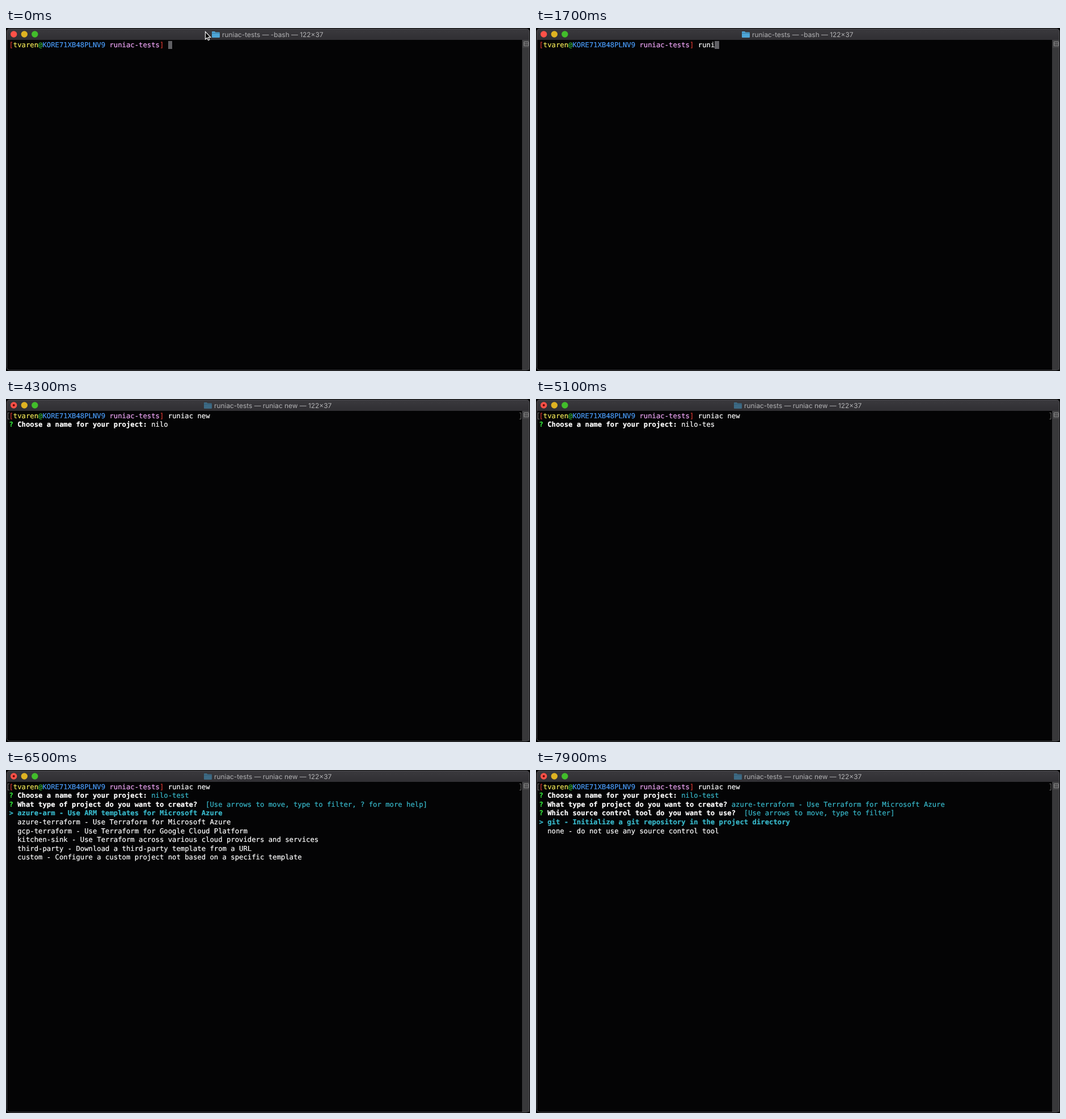
Animation, 924 px wide and 606 px high, one loop 8000 ms. Source, as an HTML page:

```html
<!DOCTYPE html>
<html lang="en">
<head>
<meta charset="utf-8">
<title>Terminal</title>
<style>
html, body { margin: 0; width: 100%; height: 100%; overflow: hidden; background: #040405; }
svg, pre { position: absolute; left: 0; top: 0; }
pre {
  margin: 0; left: 5.4px; top: 22.6px; color: #fff;
  font: 12.26px/15.6px "DejaVu Sans Mono", monospace;
  text-rendering: geometricPrecision; font-variant-ligatures: none;
  -webkit-text-stroke: .2px;
}
b { font-weight: 700; }
.red { color: #d83a32; } .user { color: #f6ec58; } .at { color: #3ab83a; }
.host { color: #4a9cfa; } .dir { color: #f0a6f8; }
.ask { color: #35e43c; } .cyan { color: #38b9cb; }
.caret { background: #606064; }
</style>
</head>
<body>
<svg width="924" height="606" viewBox="0 0 924 606">
  <defs>
    <linearGradient id="bar" x2="0" y2="1">
      <stop stop-color="#3b3a3e"/><stop offset="1" stop-color="#302f33"/>
    </linearGradient>
  </defs>
  <path d="M1 21V7Q1 1 7 1H917Q923 1 923 7V21Z" fill="url(#bar)"/>
  <path d="M910 21H923V604H910Z" fill="#38383a"/>
  <path d="M911 21H923V35H911Z" fill="#444446"/>
  <path d="M913.5 24.5H921.5V31.5H913.5ZM913.5 28H921.5" fill="none" stroke="#8c8c8c"/>
  <rect x="1.5" y="1.5" width="921" height="603" rx="5" fill="none" stroke="#4c4b4f"/>
  <circle cx="13.7" cy="11" r="5.7" fill="#fc5148"/>
  <circle id="dot" cx="13.7" cy="11" r="2" fill="#6a0b08"/>
  <circle cx="32.3" cy="11" r="5.7" fill="#dfb322"/>
  <circle cx="50.8" cy="11" r="5.7" fill="#42bd2b"/>
  <g id="heading">
    <path id="folder" d="M0 7Q0 6 1 6H5L6.5 7.5H13Q14 7.5 14 8.5V16Q14 17 13 17H1Q0 17 0 16Z"/>
    <path d="M0 9.3H14" stroke="#26516c" stroke-opacity=".5"/>
    <text id="title" x="18" y="15.5" fill="#b2b2b4" font-size="11.88" font-family="Inter, sans-serif"
      text-rendering="geometricPrecision"></text>
  </g>
  <path id="marks" d="M6 24.5H3.5V35.5H6M905.5 24.5H908V35.5H905.5" fill="none" stroke="#6c6c6c"/>
  <path id="mouse" d="M351.5 6.5V20L354.6 17.2L356.7 21.8L358.8 20.8L356.8 16.4H360.8Z"
    fill="#000" stroke="#f0f0f0" stroke-width="1.2"/>
</svg>
<pre id="screen"></pre>
<script>
const LOOP = 8000, ENTER = 2700, RETITLE = 3000, NAMED = 5700, DOWN = 6900, CHOSEN = 7700;
const command = 'runiac new', project = 'nilo-test';
const commandKeys = [1200, 1300, 1500, 1600, 1800, 1900, 2000, 2200, 2300, 2400];
const projectKeys = [3700, 3900, 4000, 4200, 4600, 4800, 4900, 5100, 5200];
const types = [
  'azure-arm - Use ARM templates for Microsoft Azure',
  'azure-terraform - Use Terraform for Microsoft Azure',
  'gcp-terraform - Use Terraform for Google Cloud Platform',
  'kitchen-sink - Use Terraform across various cloud providers and services',
  'third-party - Download a third-party template from a URL',
  'custom - Configure a custom project not based on a specific template'
];
const tools = [
  'git - Initialize a git repository in the project directory',
  'none - do not use any source control tool'
];

const el = id => document.getElementById(id);
const paint = (name, text) => `<span class="${name}">${text}</span>`;
const ask = text => `<b>${paint('ask', '?')} ${text}</b>`;
const typed = (text, keys, t) => text.slice(0, keys.filter(k => k <= t).length);
const menu = (items, chosen) => items.map((item, i) =>
  i === chosen ? `<b class="cyan">&gt; ${item}</b>` : '  ' + item);

const prompt = paint('red', '[') + paint('user', 'tvaren') + paint('at', '@') +
  paint('host', 'KORE71XB48PLNV9') + ' ' + paint('dir', 'runiac-tests') + paint('red', ']') + ' ';

function lines(t) {
  const first = prompt + typed(command, commandKeys, t);
  if (t < ENTER) return [first + paint('caret', ' ')];
  const name = typed(project, projectKeys, t);
  const out = [first, ask('Choose a name for your project:') + ' ' + (t < NAMED ? name : paint('cyan', name))];
  if (t < NAMED) return out;
  const kind = ask('What type of project do you want to create?');
  if (t < CHOSEN) {
    const hint = paint('cyan', '[Use arrows to move, type to filter, ? for more help]');
    return [...out, kind + '  ' + hint, ...menu(types, t < DOWN ? 0 : 1)];
  }
  return [...out, kind + ' ' + paint('cyan', types[1]),
    ask('Which source control tool do you want to use?') + '  ' +
      paint('cyan', '[Use arrows to move, type to filter]'),
    ...menu(tools, 0)];
}

const show = (id, on) => el(id).setAttribute('visibility', on ? 'visible' : 'hidden');
let last;

function draw(t) {
  const html = lines(t).join('\n');
  if (html !== last) el('screen').innerHTML = last = html;
  const busy = t >= RETITLE;
  el('title').textContent = `runiac-tests — ${busy ? command : '-bash'} — 122×37`;
  el('heading').setAttribute('transform', `translate(${busy ? 349 : 363} 0)`);
  el('folder').setAttribute('fill', busy ? '#3d6a84' : '#4ea5d6');
  show('dot', busy);
  show('marks', t >= ENTER);
  show('mouse', t < commandKeys[0]);
}

function tick() {
  draw(performance.now() % LOOP);
  requestAnimationFrame(tick);
}
tick();
</script>
</body>
</html>
```
